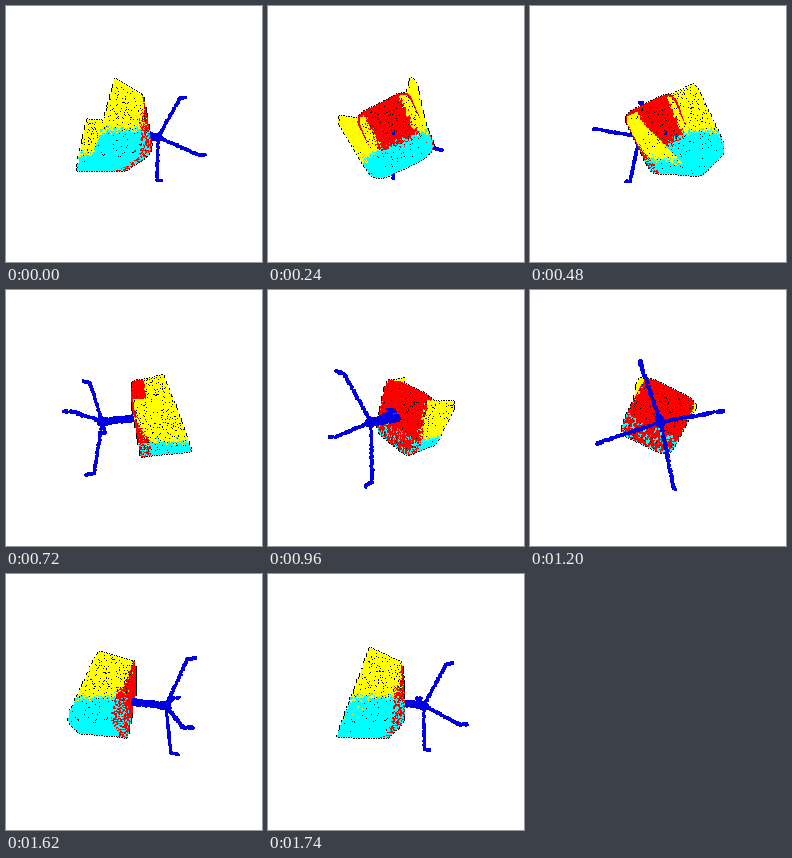
Recreate the animation shown at these times as an HTML page with a canvas. Size 256 px wide and 256 px high, loop 1.8 s.

```html
<!DOCTYPE html>
<html lang="en">
<head>
<meta charset="utf-8">
<title>Turning chair</title>
<style>
html, body { margin: 0; width: 100%; height: 100%; overflow: hidden; background: #fff; }
canvas { display: block; width: 100vmin; height: 100vmin; image-rendering: pixelated; }
</style>
</head>
<body>
<canvas id="stage" width="256" height="256"></canvas>
<script>
const SIZE = 256, MID = 128, FOCUS = 195;
const STEP = 60, STEPS = 30, START = -326;
// colours as ABGR words
const RED = 0xff0000ff, YELLOW = 0xff00ffff, CYAN = 0xffffff00;
const BLUE = 0xffe00000, BLACK = 0xff000000, WHITE = 0xffffffff;

const ctx = document.getElementById('stage').getContext('2d');
const image = ctx.createImageData(SIZE, SIZE);
const pixels = new Uint32Array(image.data.buffer);
const depth = new Float32Array(SIZE * SIZE);
const points = [];

let seed = 7;
function rand() {
  seed = (Math.imul(seed, 1664525) + 1013904223) >>> 0;
  return seed / 4294967296;
}
const spread = r => (rand() + rand() - 1) * r;

// u: along the stem, y: screen vertical, w: the third axis
function add(u, y, w, color, size) {
  points.push({ u, y, w, color, size });
}

// l: across the seat, f: towards its front; the seat leans and is turned
function addShell(l, f, u, color) {
  const lean = f - 0.1 * u;
  const dark = rand() < (color === YELLOW ? 0.032 : 0.02);
  add(u - 3.5 + 0.14 * f + (dark ? 0 : spread(0.5)),
      0.44 * l - 0.9 * lean - 3, -0.9 * l - 0.44 * lean - 1,
      dark ? BLACK : color, dark ? 1 : 2);
}

const isBack = (f, u) => f - 0.1 * u + spread(6) < -13;

function partColor(l, f) {
  if (isBack(f, -7)) return CYAN;
  return Math.abs(l) + spread(4) > 19 ? YELLOW : RED;
}

// rounded square, angle measured from the back
function outline(a) {
  const s = Math.sin(a), c = Math.cos(a);
  const r = (Math.abs(s) ** 7 + Math.abs(c) ** 7) ** (-1 / 7);
  return [s * r, -c * r];
}
const seatF = q => q * (q < 0 ? 33 : 28);

function buildShell() {
  for (let i = 0; i < 17000; i++) {
    const [p, q] = outline((rand() * 2 - 1) * 2.36);
    const v = rand();
    const l = p * (28 + v * (3 + 8 * q));
    const f = seatF(q) + 2 * v * q;
    const u = -v * (38 - 0.26 * f);
    addShell(l, f, u, isBack(f, u) ? CYAN : YELLOW);
  }
  for (let i = 0; i < 7000; i++) {
    const [p, q] = outline(rand() * Math.PI * 2);
    const r = Math.sqrt(rand());
    const l = p * r * 28, f = seatF(q) * r;
    addShell(l, f, -7, partColor(l, f));
    const mixed = f < -13 && rand() < 0.2;
    addShell(l * 0.98, f * 0.98, 0, mixed ? CYAN : RED);
  }
  // red lip that fades out up the walls
  for (let i = 0; i < 3500; i++) {
    const [p, q] = outline(rand() * Math.PI * 2);
    const f = seatF(q);
    const cyan = f < -13 && rand() < 0.4;
    addShell(p * 28.3, f * 1.01, -9 * rand() ** 1.6, cyan ? CYAN : RED);
  }
}

function tube(a, b, radius, count) {
  for (let i = 0; i < count; i++) {
    const k = rand(), t = rand() * 2 * Math.PI, r = radius * Math.sqrt(rand());
    const at = j => a[j] + (b[j] - a[j]) * k;
    add(at(0) + spread(radius), at(1) + r * Math.cos(t), at(2) + r * Math.sin(t), BLUE, 2);
  }
}

function buildBase() {
  const hub = [32, 3.5, 0];
  tube([-4, 0, -1], hub, 3.2, 850);
  tube([-12, -1, -1], [-4, 0, -1], 1.6, 70);
  tube([30, 3.3, 0], [34, 3.8, 0], 3.6, 180);
  const tips = [[57, -40, 16.5], [54, -5, -44.7], [46, 54.5, -9.5], [46, 19.4, 49]];
  for (const tip of tips) {
    const knee = [tip[0] - 8, tip[1] * 0.97, tip[2] * 0.97];
    tube(hub, knee, 1.2, 280);
    tube(knee, tip, 1.2, 60);
  }
}

function plot(pt, cos, sin) {
  const x = pt.u * cos + pt.w * sin;
  let z = pt.w * cos - pt.u * sin;
  const s = FOCUS / (FOCUS - z);
  const px = Math.round(MID + x * s - pt.size / 2);
  const py = Math.round(MID + pt.y * s - pt.size / 2);
  if (pt.color === BLACK) z += 1;
  for (let j = py; j < py + pt.size; j++) {
    for (let i = px; i < px + pt.size; i++) {
      const k = j * SIZE + i;
      if (z > depth[k]) {
        depth[k] = z;
        pixels[k] = pt.color;
      }
    }
  }
}

// dotted dark rim around the shell
function edge() {
  const isShell = c => c === RED || c === YELLOW || c === CYAN;
  const rim = [];
  for (let k = SIZE; k < pixels.length - SIZE; k++) {
    if (pixels[k] !== WHITE) continue;
    const near = [k - 1, k + 1, k - SIZE, k + SIZE];
    if (near.some(n => isShell(pixels[n])) && (k * 7 + (k >> 8) * 3) % 5 < 3) rim.push(k);
  }
  for (const k of rim) pixels[k] = BLACK;
}

function draw(step) {
  const a = (START + step * 360 / STEPS) * Math.PI / 180;
  const cos = Math.cos(a), sin = Math.sin(a);
  pixels.fill(WHITE);
  depth.fill(-1e6);
  for (const pt of points) plot(pt, cos, sin);
  edge();
  ctx.putImageData(image, 0, 0);
}

buildShell();
buildBase();

const begin = performance.now();
let shown = -1;
function tick() {
  const step = Math.floor((performance.now() - begin) / STEP) % STEPS;
  if (step !== shown) draw(shown = step);
  requestAnimationFrame(tick);
}
tick();
</script>
</body>
</html>
```
